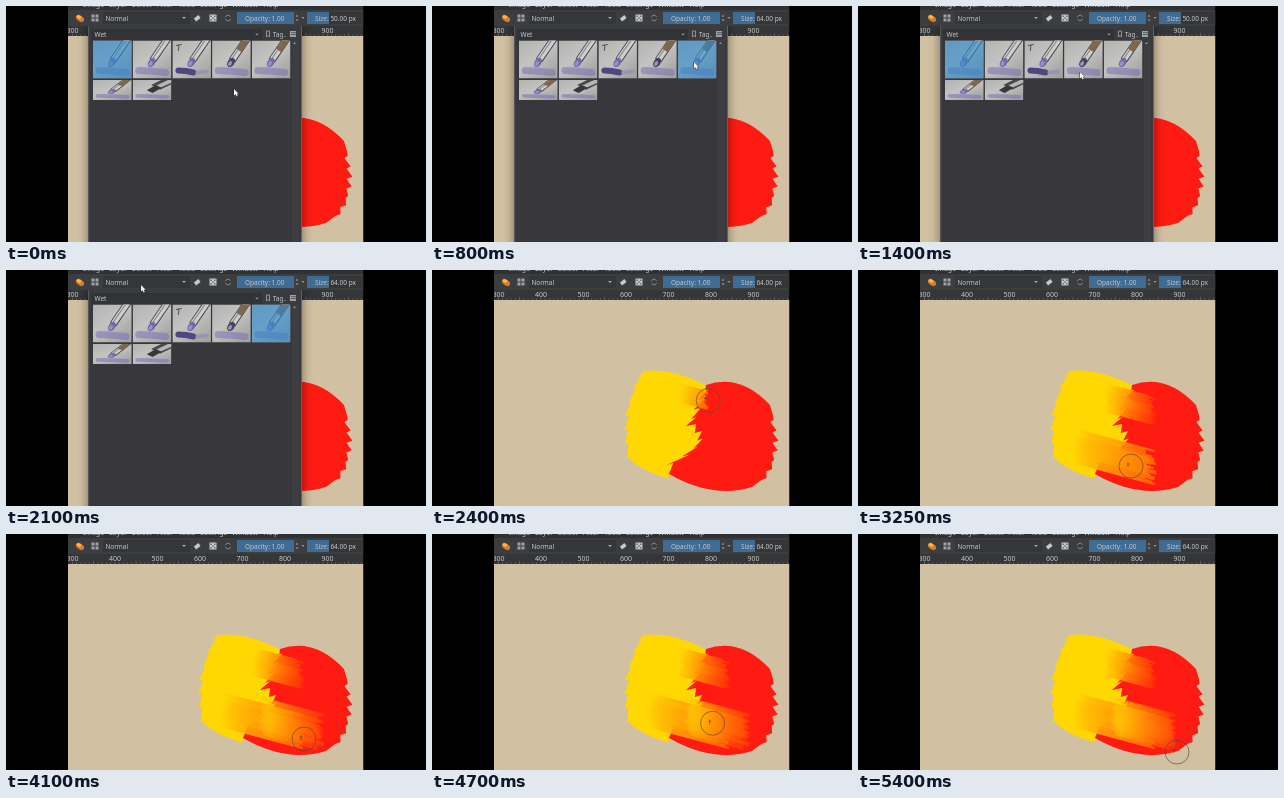
Animation of 420x236 px, one loop 5450 ms. Source, as an HTML page with a canvas:

```html
<!DOCTYPE html>
<html lang="en">
<head>
<meta charset="utf-8">
<title>Wet brush blending</title>
<style>
html, body { margin: 0; width: 100%; height: 100%; overflow: hidden; background: #000; }
canvas { display: block; width: 420px; height: 236px; }
</style>
</head>
<body>
<canvas id="stage" width="420" height="236"></canvas>
<script>
const g = document.getElementById('stage').getContext('2d');
const LOOP = 5450, CLOSE = 2300, LEFT = 62, RIGHT = 357.5, WIDE = RIGHT - LEFT;
const TEXT = '#c6c8c9', BLUE = '#406b93', BAR = '#3b3d3f', FIELD = '#343638';

// Pointer stops: time, x, y
const pointer = [
  [0, 228, 83], [450, 128, 58], [800, 262, 56], [1200, 104, 56],
  [1400, 222, 66], [1550, 262, 52], [2100, 135, 15], [CLOSE, 70, 10]
];
// Each pass sweeps rows from x0 to x1, then rests; green sets how red its tail is
const passes = [
  { end: 2700, x0: 245, y0: 122, x1: 298, spread: 10, rows: 2, rest: [253, 179], green: 50, force: .8 },
  { end: 3250, x0: 213, y0: 167, x1: 299, spread: 16, rows: 3, rest: [273, 196], green: 115, force: .85 },
  { end: 4100, x0: 250, y0: 171, x1: 318, spread: 19, rows: 4, rest: [298, 205], green: 65, force: .55 },
  { end: 5400, x0: 252, y0: 173, x1: 318, spread: 17, rows: 5, rest: [319, 218], green: 80, force: .25 }
];

const rand = i => { const v = Math.sin(i * 12.9898) * 43758.5453; return v - Math.floor(v); };
const mix = (a, b, k) => a + (b - a) * k;
const smooth = k => k * k * (3 - 2 * k);

function at(path, t, ease = k => k) {
  const i = path.findIndex(p => p[0] >= t);
  if (i < 1) return path[i ? path.length - 1 : 0].slice(1, 3);
  const a = path[i - 1], b = path[i], k = ease((t - a[0]) / (b[0] - a[0]));
  return [mix(a[1], b[1], k), mix(a[2], b[2], k)];
}

// Turn the passes into one brush path and a list of smears
const brush = [], smears = [];
let from = CLOSE;
for (const p of passes) {
  const step = (p.end - from) / (p.rows + .5);
  for (let r = 0; r < p.rows; r++) {
    const y = p.y0 + p.spread * r / (p.rows - 1);
    const a = [from + (r + .3) * step, p.x0, y];
    const b = [from + (r + .85) * step, p.x1, y + (p.x1 - p.x0) * .27];
    brush.push(a, b);
    smears.push({ a, b, green: p.green, force: p.force });
  }
  brush.push([p.end, ...p.rest]);
  from = p.end;
}

function rect(x, y, w, h, color) { g.fillStyle = color; g.fillRect(x, y, w, h); }
function text(s, x, y, size = 6.5) {
  g.font = `${size}px "Noto Sans", "Open Sans", sans-serif`;
  g.fillStyle = TEXT;
  g.fillText(s, x, y);
}
function line(x0, y0, x1, y1, width, color) {
  g.lineWidth = width;
  g.strokeStyle = color;
  g.beginPath();
  g.moveTo(x0, y0);
  g.lineTo(x1, y1);
  g.stroke();
}
function oval(x, y, rx, ry, turn, color) {
  g.fillStyle = color;
  g.beginPath();
  g.ellipse(x, y, rx, ry, turn, 0, 7);
  g.fill();
}
function triangle(x, y, r, up) {
  const h = up ? -r : r;
  g.fillStyle = '#a9acae';
  g.beginPath();
  g.moveTo(x - r, y - h / 2);
  g.lineTo(x + r, y - h / 2);
  g.lineTo(x, y + h / 2);
  g.fill();
}

// Ragged edge along a quadratic curve
function ragged(path, x0, y0, cx, cy, x1, y1, teeth, depth, seed) {
  for (let i = 0; i <= teeth; i++) {
    const k = i / teeth, n = 1 - k;
    const x = n * n * x0 + 2 * n * k * cx + k * k * x1;
    const y = n * n * y0 + 2 * n * k * cy + k * k * y1;
    const d = depth * (.5 + rand(seed + i)) / 2;
    path.lineTo(x + d, y - 1);
    path.lineTo(x - d, y + 1);
  }
}
const yellow = new Path2D('M212 101Q240 98 275 116L290 130 275 180 235 208Q215 203 198 190');
ragged(yellow, 197, 188, 188, 145, 208, 106, 6, 4, 3);
const red = new Path2D('M274 115Q308 103 338 135L341 145');
ragged(red, 340, 151, 350, 183, 332, 209, 6, 4, 8);
red.lineTo(320, 217);
red.quadraticCurveTo(280, 229, 237, 204);
ragged(red, 238, 194, 285, 172, 259, 155, 5, 7, 5);
ragged(red, 262, 148, 266, 134, 275, 120, 3, 5, 9);
const paintArea = new Path2D(yellow);
paintArea.addPath(red);

// A bundle of bristle lines that drags yellow over red
function smear({ a, b, green, force }, t, seed) {
  const [t0, x0, y0] = a, [t1, x1, y1] = b, width = 17, count = 12;
  const k = Math.min(1, (t - t0) / (t1 - t0));
  const fade = g.createLinearGradient(x0, y0, x1, y1);
  const stop = (pos, tone, alpha) => fade.addColorStop(pos, `rgba(255,${tone},5,${alpha})`);
  stop(0, 205, 0);
  stop(.22, 185, force);
  stop(.6, mix(185, green, .55), force);
  stop(1, green, force * .8);
  for (let i = 0; i < count; i++) {
    const off = (i / (count - 1) - .5) * width, r = rand(seed * 31 + i);
    const end = k * (.86 + .14 * r), start = .12 * rand(seed * 17 + i);
    if (end > start)
      line(mix(x0, x1, start), mix(y0, y1, start) + off, mix(x0, x1, end), mix(y0, y1, end) + off, 1.5 + r, fade);
  }
}

function painting(t) {
  rect(LEFT, 30, WIDE, 206, '#d2c0a2');
  g.fillStyle = '#ffd703';
  g.fill(yellow);
  g.fillStyle = '#ff1b12';
  g.fill(red);
  g.save();
  g.clip(paintArea);
  smears.forEach((s, i) => { if (t > s.a[0]) smear(s, t, i); });
  g.restore();
}

function ruler() {
  rect(LEFT, 20, WIDE, 10, FIELD);
  for (let i = 0; i < 70; i++) {
    const h = i % 10 ? (i % 5 ? 1.5 : 3) : 9;
    rect(66 + i * 4.25, 30 - h, .6, h, '#7b7d7f');
  }
  for (let n = 3; n < 10; n++) {
    const x = 60.5 + (n - 3) * 42.5;
    rect(x - .5, 21, 13, 7, FIELD);
    text(n * 100, x, 27.3, 7);
  }
}

function toolbar(size) {
  rect(LEFT, 0, WIDE, 4, '#2f3133');
  let x = 77;
  for (const s of ['Image', 'Layer', 'Select', 'Filter', 'Tools', 'Settings', 'Window', 'Help']) {
    text(s, x, 1, 7);
    x += g.measureText(s).width + 5;
  }
  rect(LEFT, 4, WIDE, 16, BAR);
  oval(74, 12.5, 4.5, 2.8, .6, '#e07b20');
  oval(73, 11, 2.5, 1.5, .4, '#f7b851');
  for (let i = 0; i < 4; i++) rect(85.5 + i % 2 * 4, 8.5 + (i >> 1) * 4, 3, 3, '#a0a3a5');
  rect(97, 6, 87, 12, FIELD);
  text('Normal', 99.5, 14.5, 6.4);
  triangle(178, 12, 2);
  line(189, 14, 193.5, 10.5, 3.5, TEXT);
  rect(203.5, 8.5, 7, 7, TEXT);
  for (let i = 0; i < 9; i += 2) rect(204.6 + i % 3 * 1.8, 9.6 + (i / 3 | 0) * 1.8, 1.2, 1.2, BAR);
  g.strokeStyle = '#85888a';
  g.lineWidth = 1;
  for (const turn of [.3, 3.4]) {
    g.beginPath();
    g.arc(222, 12, 2.8, turn, turn + 2.4);
    g.stroke();
  }
  rect(231, 6, 57, 12, BLUE);
  text('Opacity: 1.00', 239, 14.5);
  triangle(291, 9.7, 1.5, true);
  triangle(291, 14.3, 1.5);
  triangle(297, 12, 1.6);
  rect(301, 6, RIGHT - 301, 12, FIELD);
  rect(301, 6, 22, 12, BLUE);
  text(`Size: ${size}.00 px`, 309, 14.5);
}

function thumb(x, y, h, i, selected) {
  const flat = i == 2, marker = i == 6, wood = i > 2 && !marker;
  g.save();
  g.beginPath();
  g.rect(x, y, 38.5, h);
  g.clip();
  g.translate(x, y);
  g.scale(1, h / 38);
  const back = g.createLinearGradient(0, 0, 30, 38);
  back.addColorStop(0, '#b2b2b0');
  back.addColorStop(.5, '#c3c3c1');
  back.addColorStop(1, '#a3a3a2');
  rect(0, 0, 39, 38, back);
  // Soft paint trail
  g.lineCap = 'round';
  g.strokeStyle = flat ? '#51467f' : 'rgba(125,112,185,.55)';
  g.lineWidth = flat ? 6 : 7;
  g.beginPath();
  g.moveTo(6, 30);
  g.quadraticCurveTo(13, 30, flat ? 21 : 33, 32);
  g.stroke();
  if (flat) {
    line(25, 32, 34, 31, 4, '#9a94b0');
    line(4, 5, 9, 4, .9, '#444');
    line(6.5, 5, 6, 10, .9, '#444');
  }
  g.lineCap = 'butt';
  if (marker) {
    line(40, -2, 23, 14, 13, '#48484a');
    line(40, 0, 25, 13, 6, '#b5b5b4');
    line(26, 12, 17, 22, 8, '#38383b');
  } else {
    line(37, -5, 20, 20, 7.5, '#4b4a4e');
    line(37, -5, 20.5, 19, 5.5, '#cfcfce');
    line(36, -5, 20, 18, 1.2, '#8b8b8f');
    if (wood) line(37, -5, 27, 10, 6, '#80664a');
    oval(19, 22, 5, 3.4, 2.15, i == 3 ? '#47415c' : '#746ba6');
    oval(18, 23, 2.6, 1.6, 2.15, '#9a92c6');
  }
  if (selected) rect(0, 0, 39, 38, 'rgba(46,138,204,.62)');
  g.restore();
}

function panel(chosen) {
  g.save();
  g.shadowColor = 'rgba(0,0,0,.45)';
  g.shadowBlur = 10;
  g.beginPath();
  g.rect(LEFT, 20, WIDE, 216);
  g.clip();
  rect(82, 20, 214, 240, '#3a3b3e');
  g.restore();
  rect(82, 20, 1, 216, '#55575a');
  rect(295, 20, 1, 216, '#606265');
  rect(85, 23, 171, 11, '#323336');
  text('Wet', 88.5, 31);
  triangle(251, 28.5, 1.7);
  g.strokeStyle = TEXT;
  g.lineWidth = .6;
  g.stroke(new Path2D('M260.5 25h3v6l-1.5-1.5-1.5 1.5z'));
  text('Tag', 267, 31, 6.2);
  triangle(279, 31, 1);
  rect(284, 25, 6, 6, '#a0a3a5');
  for (let i = 0; i < 2; i++) rect(285, 26.4 + i * 1.8, 5, .7, BAR);
  rect(85, 34, 209, 202, '#37373c');
  rect(286, 34, 7, 202, '#3d3e41');
  triangle(288.5, 37, 1.5, true);
  for (let i = 0; i < 7; i++)
    thumb(87 + i % 5 * 39.7, i < 5 ? 34.5 : 74, i < 5 ? 38 : 20, i, i == chosen);
}

function arrow(x, y) {
  const shape = new Path2D(`M${x} ${y}v6.5l1.5-1.3 1.2 2.4 1.1-.5-1.1-2.4h2z`);
  g.lineWidth = .8;
  g.strokeStyle = '#222';
  g.stroke(shape);
  g.fillStyle = '#f4f4f4';
  g.fill(shape);
}
function ring(x, y) {
  const ink = 'rgba(95,75,50,.85)';
  g.lineWidth = .8;
  g.strokeStyle = ink;
  g.beginPath();
  g.arc(x, y, 12, 0, 7);
  g.stroke();
  line(x - 4, y - 2, x - 1, y - 2, .8, ink);
  line(x - 3, y - 3.5, x - 3, y + 1, .8, ink);
}

function draw(now) {
  const t = Math.floor(now % LOOP / 50) * 50;
  const last = t >= 800 && t < 1200 || t >= 1550;
  rect(0, 0, 420, 236, '#000');
  g.save();
  g.beginPath();
  g.rect(LEFT, 0, WIDE, 236);
  g.clip();
  painting(t);
  ruler();
  toolbar(last ? 64 : 50);
  if (t < CLOSE) {
    panel(last ? 4 : 0);
    arrow(...at(pointer, t, smooth));
  } else ring(...at(brush, t));
  g.restore();
}

const begin = performance.now();
function tick() {
  draw(performance.now() - begin);
  requestAnimationFrame(tick);
}
tick();
</script>
</body>
</html>
```
